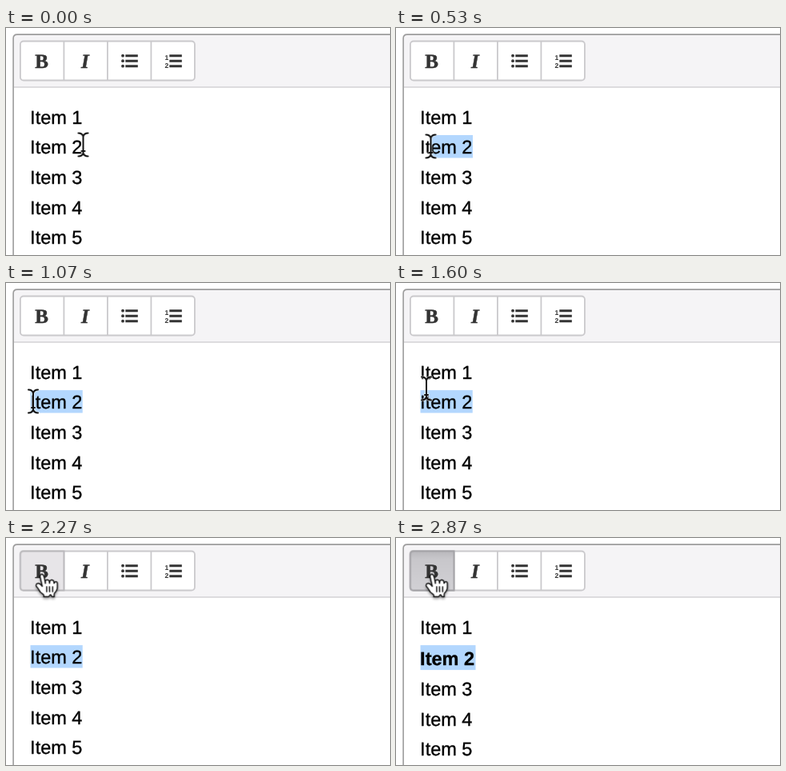
An HTML page for the animation above (3390 ms loop, 480 by 284 pixels).

```html
<!DOCTYPE html>
<html lang="en">
<head>
<meta charset="utf-8">
<title>Bold toggle in a text editor</title>
<style>
html, body { margin: 0; width: 100%; height: 100%; overflow: hidden; background: #fff; }
svg { display: block; }
text { text-rendering: geometricPrecision; }
.items { font: 23.5px "Liberation Sans", Arial, sans-serif; fill: #000; }
.items text { stroke: #000; stroke-width: .35; }
.items .strong { font-weight: bold; }
.icon { font: bold 25px "Liberation Serif", Georgia, serif; fill: #333; stroke: #333; stroke-width: .5; }
.slant { font-style: italic; }
.num { font: bold 8.5px "Liberation Sans", Arial, sans-serif; fill: #333; }

.anim { animation: 3390ms step-end infinite; }
#beam { animation-name: beam; }
#hand { animation-name: hand; }
#sel { animation-name: select; }
#hover { animation-name: hover; }
#press { animation-name: press; }
#plain { animation-name: plain; }
#bold { animation-name: bold; }

/* Drag left across the line, rest, then head for the toolbar */
@keyframes beam {
  0% { transform: translate(96.5px, 146px); visibility: visible; }
  2.05% { transform: translate(96px, 146px); }
  3.82% { transform: translate(92px, 146px); }
  5.89% { transform: translate(85px, 147px); }
  7.95% { transform: translate(75px, 147px); }
  9.72% { transform: translate(65px, 147px); }
  11.79% { transform: translate(56px, 148px); }
  13.85% { transform: translate(49px, 148px); }
  15.62% { transform: translate(43.5px, 148px); }
  17.69% { transform: translate(40px, 148px); }
  19.75% { transform: translate(37px, 148px); }
  21.52% { transform: translate(35px, 148px); }
  23.58% { transform: translate(34px, 148px); }
  47.18% { transform: translate(38px, 132px); }
  49.25% { transform: translate(43px, 103px); }
  51.02%, 100% { transform: translate(43px, 103px); visibility: hidden; }
}
@keyframes hand {
  0% { transform: translate(47.5px, 68px); visibility: hidden; }
  51.02% { transform: translate(47.5px, 68px); visibility: visible; }
  53.08% { transform: translate(46.5px, 57px); }
  55.15% { transform: translate(46px, 51px); }
  56.92% { transform: translate(45.5px, 48px); }
  58.98% { transform: translate(45px, 46px); }
  61.05%, 100% { transform: translate(45px, 45.5px); visibility: visible; }
}
/* Selection edge snaps to letter boundaries */
@keyframes select {
  0% { transform: translateX(66px); }
  5.89% { transform: translateX(52.2px); }
  7.95% { transform: translateX(45.7px); }
  9.72% { transform: translateX(26.1px); }
  13.85% { transform: translateX(13.1px); }
  17.69% { transform: translateX(6.5px); }
  23.58%, 100% { transform: translateX(0); }
}
@keyframes hover {
  0% { opacity: 0; }
  51.02%, 100% { opacity: 1; }
}
@keyframes press {
  0% { opacity: 0; }
  68.72% { opacity: .7; }
  70.78% { opacity: .9; }
  72.85%, 100% { opacity: 1; }
}
@keyframes plain {
  0% { visibility: visible; }
  68.72%, 100% { visibility: hidden; }
}
@keyframes bold {
  0% { visibility: hidden; }
  68.72%, 100% { visibility: visible; }
}
</style>
</head>
<body>
<svg width="480" height="284" viewBox="0 0 480 284">
  <defs>
    <linearGradient id="pressed" x2="0" y2="1">
      <stop offset="0" stop-color="#b9b8bc"/>
      <stop offset=".2" stop-color="#c8c7cb"/>
      <stop offset="1" stop-color="#d2d1d5"/>
    </linearGradient>
    <filter id="shade" x="-30%" y="-30%" width="160%" height="170%">
      <feDropShadow dx="0" dy="1.2" stdDeviation="1" flood-opacity=".35"/>
    </filter>
    <path id="bars" d="M0 35h15.500M0 41.500h15.500M0 48h15.500" stroke="#333" stroke-width="3"/>
    <path id="first" d="M73 17H22.500Q18.500 17 18.500 21V62Q18.500 66 22.500 66H73Z" stroke-width="1.800"/>
    <path id="ibeam" d="M-6-14.500Q-1-14.500 0-10Q1-14.500 6-14.500M0-10V10M-6 14.500Q-1 14.500 0 10Q1 14.500 6 14.500M-2 8H2"/>
  </defs>

  <!-- Editor frame and toolbar -->
  <g transform="translate(-.4 -.4)">
    <path d="M9.500 74.500V13.500Q9.500 8.500 14.500 8.500H490V74.500Z" fill="#f5f4f6"/>
    <path d="M10 74.500H490" stroke="#d3d2d5" stroke-width="1.500"/>
    <path d="M9.500 290V13.500Q9.500 8.500 14.500 8.500H490" fill="none" stroke="#9c9c9c" stroke-width="1.600"/>
  </g>

  <g transform="translate(-.6 -.5)">
    <rect x="18.500" y="17" width="218" height="49" rx="4" fill="#fff" stroke="#cac9cc" stroke-width="1.800"/>
    <path d="M73 17V66M127.500 17V66M182 17V66" stroke="#cac9cc" stroke-width="1.800"/>
    <use id="hover" class="anim" href="#first" fill="#e7e5e8" stroke="#b9b8bb"/>
    <use id="press" class="anim" href="#first" fill="url(#pressed)" stroke="#a3a2a6"/>
  </g>

  <text class="icon" x="36.300" y="49.700">B</text>
  <text class="icon slant" x="94" y="49.700">I</text>
  <use href="#bars" x="149.300" y="-.3"/>
  <g fill="#333">
    <circle cx="146" cy="34.700" r="1.900"/>
    <circle cx="146" cy="41.200" r="1.900"/>
    <circle cx="146" cy="47.700" r="1.900"/>
  </g>
  <use href="#bars" x="204.300" y="-.3"/>
  <text class="num" x="198.500" y="40.300">1</text>
  <text class="num" x="198.500" y="50">2</text>

  <!-- Document text -->
  <g class="items" transform="translate(-.9 -.4)">
    <text x="31" y="120">Item 1</text>
    <g id="plain" class="anim">
      <svg x="31.400" y="134.500" width="65.500" height="28.500" overflow="hidden">
        <rect id="sel" class="anim" width="65.500" height="28.500" fill="#b3d7fe"/>
      </svg>
      <text x="31" y="157.700">Item 2</text>
      <text x="31" y="195.400">Item 3</text>
      <text x="31" y="233">Item 4</text>
      <text x="31" y="270.600">Item 5</text>
    </g>
    <g id="bold" class="anim">
      <rect x="31.400" y="134.500" width="69" height="31" fill="#b3d7fe"/>
      <text class="strong" x="31" y="159.500">Item 2</text>
      <text x="31" y="197.400">Item 3</text>
      <text x="31" y="235">Item 4</text>
      <text x="31" y="272.600">Item 5</text>
    </g>
  </g>

  <!-- Pointers -->
  <g id="beam" class="anim" fill="none" stroke-linecap="round">
    <use href="#ibeam" stroke="#fff" stroke-opacity=".6" stroke-width="3.600"/>
    <use href="#ibeam" stroke="#111" stroke-width="2"/>
  </g>
  <g id="hand" class="anim">
    <g transform="scale(1.85) translate(-12.4 -8.4)" filter="url(#shade)" stroke="#111" stroke-width=".8" stroke-linejoin="round" stroke-linecap="round">
      <path fill="#fff" d="M11.300 20.400C11 20 10.700 19.300 10.100 18.400 9.800 17.900 8.900 16.900 8.600 16.500 8.400 16.100 8.400 15.900 8.500 15.500 8.600 14.900 9.200 14.400 9.900 14.400 10.400 14.400 10.900 14.800 11.300 15.100 11.800 15.600 12.200 16.100 12.600 16.500L12.100 14.300 11.200 10.400C11.100 9.900 11.100 9 11.500 8.600 11.800 8.300 12.400 8.200 12.800 8.400 13.300 8.700 13.600 9.400 13.700 9.700L14.200 11.700 14.700 14.500C14.700 14.100 14.600 13.400 14.700 13 14.800 12.700 15 12.300 15.400 12.200 15.700 12.100 16 12.100 16.300 12.100 16.600 12.200 16.900 12.400 17.100 12.600 17.500 13.200 17.500 14.500 17.500 14.400 17.600 14 17.600 13.200 17.800 12.800 17.900 12.600 18.300 12.400 18.500 12.300 18.800 12.200 19.200 12.200 19.500 12.300 19.700 12.300 20.100 12.600 20.200 12.800 20.400 13.100 20.500 14.100 20.600 14.500 20.600 14.600 20.700 14.100 20.900 13.800 21.300 13.200 22.700 13 22.800 14.400V16.700C22.800 17.100 22.700 18 22.600 18.400 22.500 18.700 22.200 19.400 21.900 19.800 21.900 19.800 20.800 21 20.700 21.600 20.600 22.200 20.600 22.900 20.700 23.500 20.700 23.500 19.900 23.600 19.500 23.500 19.100 23.400 18.600 22.700 18.500 22.400 18.300 22.100 18 22.100 17.800 22.400 17.600 22.800 17.100 23.500 16.700 23.500 16 23.600 14.600 23.500 13.600 23.500 13.600 23.500 13.800 22.500 13.400 22.100Z"/>
      <path fill="none" d="M19.600 20.100V16.700M17.600 20.100L17.500 16.700M15.600 16.700V20.100"/>
    </g>
  </g>
</svg>
</body>
</html>
```
